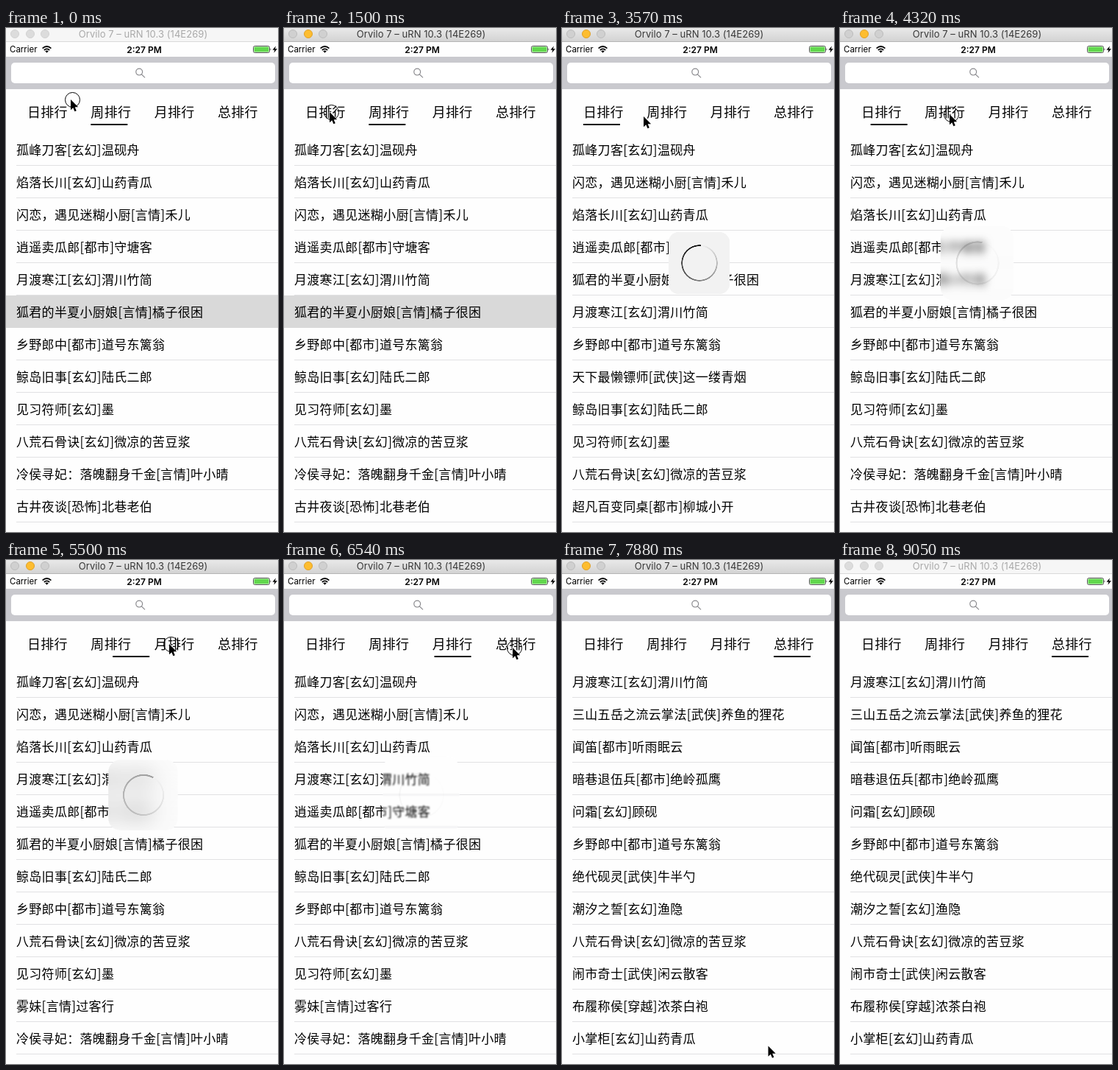
An HTML page for the animation above (9.15 s loop, 370 px wide and 684 px high).

```html
<!DOCTYPE html>
<html lang="zh-CN">
<head>
<meta charset="utf-8">
<title>排行</title>
<style>
html, body { margin: 0; width: 100%; height: 100%; overflow: hidden; background: #fff; }
#stage { position: absolute; left: 0; top: 0; width: 370px; height: 684px; overflow: hidden; background: #fefefe; color: #000; }
#stage > *, #hud > * { position: absolute; }
.ui { font-family: Inter, "Liberation Sans", sans-serif; white-space: nowrap; }
.zh { font-family: "Noto Sans CJK SC", "Noto Sans CJK", sans-serif; letter-spacing: .3px; white-space: nowrap; }
#bar { left: 0; top: 0; width: 370px; height: 18px; border-bottom: 1px solid #dadada; background: #f6f6f6; }
#bar.on { background: linear-gradient(#e9e9e9, #d3d3d3); border-color: #b5b5b5; }
#bar i { position: absolute; top: 2px; width: 10px; height: 10px; border: 1px solid #d2d2d2; border-radius: 50%; background: #dcdcdc; }
#bar.on i { background: #d0d0d0; border-color: #bcbcbc; }
#bar.on i.mid { background: #fdbd30; border-color: #e0a028; }
#title { position: absolute; left: 86px; width: 201px; top: 0; line-height: 17px; text-align: center; font-size: 13px; letter-spacing: .05px; color: #a9a9a9; }
#bar.on #title { color: #383838; }
#carrier { left: 5px; top: 21px; font-size: 11.5px; line-height: 17px; }
#clock { left: 138px; width: 100px; top: 21px; text-align: center; font-size: 12px; line-height: 17px; font-weight: 600; }
#search { left: 0; top: 39px; width: 370px; height: 44px; background: #c9c9ce; }
#search b { position: absolute; left: 7px; top: 8px; width: 359px; height: 28px; border-radius: 5px; background: #fff; }
.tab { top: 100px; font-size: 18px; line-height: 27px; }
#line { left: 0; top: 130px; width: 50px; height: 2px; background: #000; }
.row { position: absolute; left: 0; width: 356px; height: 43px; padding-left: 14px; font-size: 17px; line-height: 44px; }
.row::after { content: ""; position: absolute; left: 14px; right: 0; bottom: -1px; height: 1px; background: #e1e1e3; }
.row.sel { background: #d9d9d9; box-shadow: 0 1px #d9d9d9; }
.row.sel::after { background: #d9d9d9; }
#hud { left: 145px; top: 277px; width: 83px; height: 84px; border-radius: 14px; overflow: hidden; background: #fefefe; }
#back { left: -145px; top: -277px; width: 370px; height: 684px; transform-origin: 186.5px 319px; }
#tint { inset: 0; background: #f2f2f2; }
#spin { left: 16.5px; top: 17px; width: 50px; height: 50px; border-radius: 50%;
  -webkit-mask: radial-gradient(circle, transparent 22.6px, #000 23.2px, #000 24.6px, transparent 25px);
  mask: radial-gradient(circle, transparent 22.6px, #000 23.2px, #000 24.6px, transparent 25px); }
#icons, #pointer { left: 0; top: 0; }
</style>
</head>
<body>
<div id="stage">
  <div id="bar" class="ui"><i style="left:6px"></i><i class="mid" style="left:27px"></i><i style="left:47px"></i>
    <div id="title">Orvilo 7 – uRN 10.3 (14E269)</div></div>
  <div id="carrier" class="ui">Carrier</div>
  <div id="clock" class="ui">2:27 PM</div>
  <div id="search"><b></b></div>
  <svg id="icons" width="370" height="90" fill="none">
    <g stroke="#000" stroke-width="1.7">
      <path d="M49.6 27.6Q55.5 22.4 61.4 27.6M51.8 30Q55.5 26.8 59.2 30"/>
    </g>
    <path d="M53.2 31.2Q55.5 29.6 57.8 31.2L55.5 33.8Z" fill="#000"/>
    <rect x="336.5" y="24.5" width="22" height="9" rx="2" stroke="#555"/>
    <rect x="337.5" y="25.5" width="20" height="7" rx="1" fill="#62d84e"/>
    <path d="M359.5 27.5Q361.5 29 359.5 30.5Z" fill="#555"/>
    <path d="M367 24.5L362.5 29.8H365.4L364.4 33.8L369 28.3H366Z" fill="#000"/>
    <g stroke="#8a8a8e" stroke-width="1.2"><circle cx="181.2" cy="59.6" r="4.4"/><path d="M184.4 62.8L189 67.4"/></g>
  </svg>
  <div id="line"></div>
  <div id="hud"><div id="back"></div><div id="tint"></div><div id="spin"></div></div>
  <svg id="pointer" width="370" height="684">
    <g id="mouse">
      <path transform="scale(.94)" d="M0 0V15.2L3.5 11.9L5.8 17.2L8.3 16.1L6 10.9H10.8Z" fill="#000" stroke="#fff" stroke-width="1.6" paint-order="stroke" stroke-linejoin="round"/>
      <circle id="ring" cx="2.5" cy="0.5" r="10" fill="none" stroke="#000" stroke-width="1"/>
    </g>
  </svg>
</div>
<script>
const LOOP = 9150;
const $ = id => document.getElementById(id);
const stage = $('stage');

const books = {
  A: '孤峰刀客[玄幻]温砚舟', B: '焰落长川[玄幻]山药青瓜', C: '闪恋，遇见迷糊小厨[言情]禾儿',
  D: '逍遥卖瓜郎[都市]守塘客', E: '月渡寒江[玄幻]渭川竹简', F: '狐君的半夏小厨娘[言情]橘子很困',
  G: '乡野郎中[都市]道号东篱翁', H: '鲸岛旧事[玄幻]陆氏二郎', I: '见习符师[玄幻]墨',
  J: '八荒石骨诀[玄幻]微凉的苦豆浆', K: '冷侯寻妃：落魄翻身千金[言情]叶小晴', L: '古井夜谈[恐怖]北巷老伯',
  M: '天下最懒镖师[武侠]这一缕青烟', N: '超凡百变同桌[都市]柳城小开', O: '雾妹[言情]过客行',
  P: '三山五岳之流云掌法[武侠]养鱼的狸花', Q: '闻笛[都市]听雨眠云', R: '暗巷退伍兵[都市]绝岭孤鹰',
  S: '问霜[玄幻]顾砚', T: '绝代砚灵[武侠]牛半勺', U: '潮汐之誓[玄幻]渔隐',
  V: '闹市奇士[武侠]闲云散客', W: '布履称侯[穿越]浓茶白袍', X: '小掌柜[玄幻]山药青瓜'
};
const firstList = 'ABCDEFGHIJKL';

// Each tap: start, moment the spinner is dismissed, tab index, resulting list
const taps = [
  { at: 2517, end: 3600, tab: 0, list: 'ACBDFEGMHIJN' },
  { at: 4245, end: 4800, tab: 1, list: 'ACBDEFGHIJKL' },
  { at: 5380, end: 5980, tab: 2, list: 'ACBEDFHGJIOK' },
  { at: 6505, end: 7250, tab: 3, list: 'EPQRSGTUJVWX' }
];

// Pointer: time, x, y
const path = [
  [0, 88, 97], [450, 62, 114], [2680, 62, 114], [3570, 111, 120], [4020, 149, 117], [4470, 149, 117],
  [5050, 222, 114], [5640, 222, 114], [6240, 311, 119], [7140, 311, 119], [7580, 307, 627], [8180, 254, 692]
];
const presses = [[0, 150], [1500, 1640], [2530, 2680], [4320, 4470], [5500, 5640], [6540, 6680]];

// Screen refreshes: first, last, count
const refresh = [0];
[[150, 450, 3], [1500, 1640, 2], [2530, 3570, 8], [3720, 4020, 3], [4320, 5050, 6],
 [5500, 6240, 6], [6540, 7580, 8], [7730, 8180, 4], [9050, 9050, 1]].forEach(([a, b, n]) => {
  for (let i = 0; i < n; i++) refresh.push(n > 1 ? Math.round(a + (b - a) * i / (n - 1)) : a);
});

const clamp = v => Math.min(1, Math.max(0, v));
const ease = p => (1 - Math.cos(Math.PI * clamp(p))) / 2;
const tabX = i => 29 + 86.33 * i;

function add(cls, text, parent, before) {
  const el = document.createElement('div');
  el.className = cls + ' zh';
  el.textContent = text;
  return parent.insertBefore(el, before);
}
function addRow(i, parent, before) {
  const el = add('row', books[firstList[i]], parent, before);
  el.style.top = 143 + 44 * i + 'px';
  return el;
}
['日', '周', '月', '总'].forEach((c, i) => { add('tab', c + '排行', stage, $('line')).style.left = tabX(i) + 'px'; });
const rows = [...firstList].map((k, i) => addRow(i, stage, $('line')));

// Copies of the rows behind the spinner panel, seen through its frosted glass
const behind = [3, 4];
const frosted = behind.map(i => addRow(i, $('back'), null));

let shown = '';
function showList(list, selected) {
  const key = list + selected;
  if (key === shown) return;
  shown = key;
  rows.forEach((el, i) => {
    el.textContent = books[list[i]];
    el.classList.toggle('sel', i === selected);
  });
  frosted.forEach((el, i) => { el.textContent = books[list[behind[i]]]; });
}

function drawHud(t, tap) {
  const hud = $('hud'), on = tap && t < tap.end + 200;
  hud.style.display = on ? 'block' : 'none';
  if (!on) return;
  const el = t - tap.at, p = clamp(el / 220), out = clamp((t - tap.end) / 200);
  const alpha = p ** 1.8, scale = 1.3 - .3 * p - .2 * out;
  hud.style.transform = `scale(${scale})`;
  hud.style.opacity = 1 - out;
  $('back').style.transform = `scale(${1 / scale})`;
  $('back').style.filter = `blur(${50 * p * p}px)`;
  $('tint').style.opacity = alpha;
  $('spin').style.opacity = alpha;
  $('spin').style.background = `conic-gradient(from ${.36 * el - 14}deg, transparent, #000)`;
}

function drawPointer(t) {
  const last = path[path.length - 1];
  $('mouse').style.display = t < last[0] ? '' : 'none';
  const i = path.findIndex(k => k[0] > t);
  if (i < 1) return;
  const [a, x, y] = path[i - 1], [b, x2, y2] = path[i], p = (t - a) / (b - a);
  $('mouse').setAttribute('transform', `translate(${x + (x2 - x) * p} ${y + (y2 - y) * p})`);
  $('ring').style.display = presses.some(([s, e]) => t >= s && t < e) ? '' : 'none';
}

function draw(t) {
  const n = taps.filter(k => k.at <= t).length;
  const tap = taps[n - 1];
  const from = n > 1 ? taps[n - 2].tab : 1;
  const x = tap ? tabX(from) + (tabX(tap.tab) - tabX(from)) * ease((t - tap.at) / 300) : tabX(1);
  $('line').style.transform = `translateX(${x}px)`;

  const loaded = taps.filter(k => k.at + 60 <= t).pop();
  showList(loaded ? loaded.list : firstList, loaded ? -1 : 5);

  $('bar').classList.toggle('on', t >= 1500 && t < 9050);
  drawHud(t, tap);
  drawPointer(t);
}

const start = performance.now();
function tick() {
  const t = (performance.now() - start) % LOOP;
  draw(refresh.filter(r => r <= t).pop());
  requestAnimationFrame(tick);
}
tick();
</script>
</body>
</html>
```
